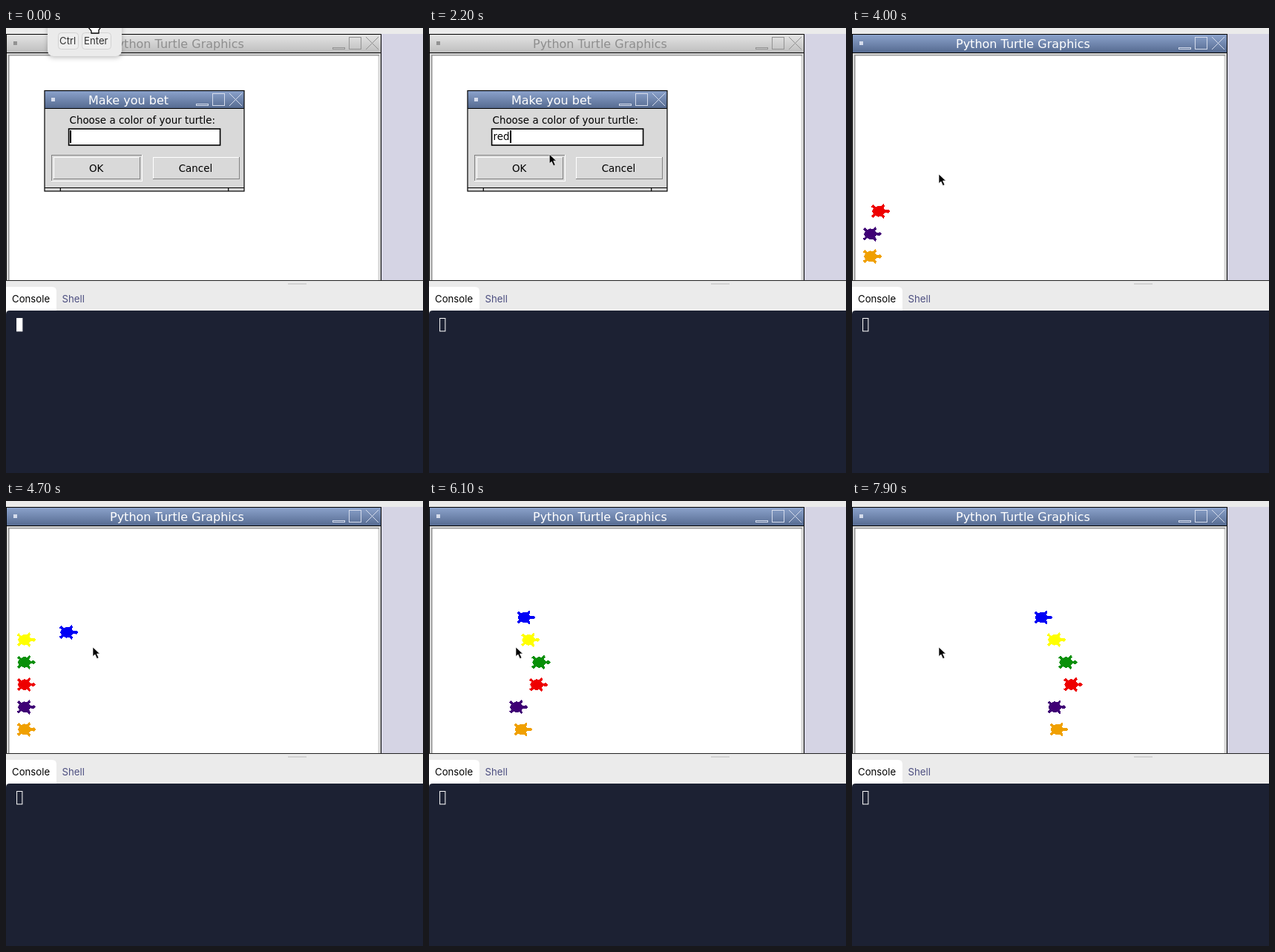
Animation of 562 by 600 pixels, one loop 8000 ms. Source, as an HTML page:

```html
<!DOCTYPE html>
<html lang="en">
<head>
<meta charset="utf-8">
<title>Turtle race</title>
<style>
  html, body { margin: 0; width: 100%; height: 100%; overflow: hidden; background: #ebebeb; }
  svg { display: block; width: 562px; height: 600px; }
  text { font-family: "DejaVu Sans", sans-serif; font-size: 13.45px; fill: #000; }
  .title { font-size: 16px; }
  .ui { font-family: Inter, sans-serif; font-size: 13.2px; }
  .crisp { shape-rendering: crispEdges; }
</style>
</head>
<body>
<svg viewBox="0 0 562 600">
  <defs>
    <linearGradient id="blue" x2="0" y2="1">
      <stop stop-color="#8ba2cb"/><stop offset="1" stop-color="#566b91"/>
    </linearGradient>
    <linearGradient id="gray" x2="0" y2="1">
      <stop stop-color="#e4e4e4"/><stop offset="1" stop-color="#bebebe"/>
    </linearGradient>
    <filter id="shadow" x="-20%" y="-40%" width="140%" height="200%">
      <feDropShadow dx="0" dy="2" stdDeviation="3" flood-opacity=".25"/>
    </filter>
    <clipPath id="canvas"><rect x="5" y="38" width="497" height="302"/></clipPath>
  </defs>

  <rect width="562" height="600" fill="#ebebeb"/>
  <rect x="506" y="8" width="56" height="332" fill="#d5d4e4"/>

  <g id="mainWindow">
    <rect x=".5" y="8.500" width="505" height="332" fill="#d9d9d9" stroke="#000"/>
    <path d="M1 33.300H505" stroke="#000" stroke-width="1.200"/>
    <rect x="3" y="36" width="500" height="304" fill="#969696"/>
    <rect x="4.700" y="37.600" width="498" height="303" fill="#e8e8e8"/>
    <rect x="4.700" y="37.600" width="496.500" height="303" fill="#fff"/>
  </g>
  <g id="mainBar"></g>
  <g id="turtles" class="crisp" clip-path="url(#canvas)"></g>

  <g id="dialog">
    <rect x="52" y="84.500" width="269" height="135.500" fill="#d9d9d9"/>
    <g id="dialogBar"></g>
    <g fill="none" stroke="#000" stroke-width="1.200">
      <rect x="52" y="84.500" width="269" height="135.500"/>
      <path d="M52 108.500H321M52 215.500H321"/>
      <path id="grips" d="M73.300 215v5M299.700 215v5"/>
      <rect x="84.600" y="136" width="204" height="22" fill="#fff" stroke-width="1.600"/>
    </g>
    <text x="85.500" y="129">Choose a color of your turtle:</text>
    <text id="entry" x="86.500" y="151"></text>
    <rect id="caret" y="138" width="2" height="17"/>
    <g id="buttons" class="crisp"></g>
    <text id="okLabel" x="112" y="193.500">OK</text>
    <text x="232.700" y="193.500">Cancel</text>
  </g>

  <rect x="0" y="340" width="562" height="1" fill="#222"/>
  <rect x="0" y="341" width="562" height="44" fill="#ebebeb"/>
  <rect x="380" y="344" width="25" height="2" fill="#d2d2d2"/>
  <path d="M0 381V349H62q6 0 6 6V381z" fill="#fff"/>
  <text class="ui" x="8" y="370.300">Console</text>
  <text class="ui" x="75.500" y="370.300" style="fill:#4d4f80">Shell</text>
  <path d="M0 600V386q0-5 5-5H562V600z" fill="#1c2133"/>
  <rect id="prompt" x="14.600" y="391.500" width="7.300" height="17.300" stroke="#fff"/>

  <g id="tooltip">
    <rect x="56" y="-20" width="100" height="58" rx="8" fill="#ebebeb" filter="url(#shadow)"/>
    <g fill="#eee" stroke="#d2d2d2">
      <rect x="70.500" y="6.500" width="27" height="22" rx="4"/>
      <rect x="102.500" y="6.500" width="39" height="22" rx="4"/>
    </g>
    <text class="ui" x="72" y="22.300" style="fill:#333">Ctrl</text>
    <text class="ui" x="105" y="22.300" style="fill:#333">Enter</text>
  </g>

  <g id="hand"><path d="M-1 0q2-2 3 0v8l8 2q3 1 2 5l-2 3v4H0v-3l-5-6q0-3 4 0z" fill="#fff" stroke="#000" stroke-width="1.300"/></g>
  <g id="arrow"><path d="M0 0V12.500L3 10L5.500 15.500L8 14.500L5.500 9H9.500z" stroke="#fff" stroke-width=".7"/></g>
  <g id="beam" fill="none">
    <path d="M-3.500 -7H-1L0 -6L1 -7H3.500M0 -6V6M-3.500 7H-1L0 6L1 7H3.500" stroke="#fff" stroke-width="2.600"/>
    <path d="M-3.500 -7H-1L0 -6L1 -7H3.500M0 -6V6M-3.500 7H-1L0 6L1 7H3.500" stroke="#000" stroke-width="1.300"/>
  </g>
</svg>
<script>
const LOOP = 8000, STEP = 100;
const $ = id => document.getElementById(id);
const show = (id, on) => { $(id).style.display = on ? '' : 'none'; };
const place = (node, x, y) => node.setAttribute('transform', `translate(${x} ${y})`);

// Value of a row of [time, a, b, ...] steps, linear in between.
function along(steps, t) {
  const next = steps.findIndex(s => s[0] > t);
  if (next < 0) return steps.at(-1).slice(1);
  if (next === 0) return steps[0].slice(1);
  const a = steps[next - 1], b = steps[next];
  const k = (t - a[0]) / (b[0] - a[0]);
  return a.slice(1).map((v, i) => v + (b[i + 1] - v) * k);
}

// Value of the last [time, value] entry that has begun.
const latest = (steps, t) => steps.findLast(s => s[0] <= t)[1];

function titleBar(x, y, width, height, label, labelX, active) {
  const ink = active ? '#fff' : '#8e8e8e', line = active ? '#d5dcec' : '#929292';
  const r = x + width;
  return `<rect class="crisp" x="${x}" y="${y}" width="${width}" height="${height}" fill="url(#${active ? 'blue' : 'gray'})"/>` +
    (label && `<g fill="none" stroke="${line}">
      <rect class="crisp" x="${x + 9}" y="${y + 9}" width="5" height="5" fill="${line}" stroke="none"/>
      <rect class="crisp" x="${r - 64.5}" y="${y + 17.5}" width="16" height="2"/>
      <rect class="crisp" x="${r - 42.5}" y="${y + 3.5}" width="16" height="16"/>
      <path d="M${r - 20} ${y + 3}l17 17m0-17l-17 17"/></g>
      <text class="title" x="${labelX}" y="${y + 18}" style="fill:${ink}">${label}</text>`);
}

function bevel(x, y, w, h, fill, sunken) {
  const [a, b] = sunken ? ['#828282', '#fff'] : ['#fff', '#828282'];
  return `<rect x="${x}" y="${y}" width="${w}" height="${h}" fill="${fill}"/>
    <path d="M${x + .5} ${y + h}V${y + .5}H${x + w}" fill="none" stroke="${a}"/>
    <path d="M${x} ${y + h - .5}H${x + w - .5}V${y}" fill="none" stroke="${b}"/>`;
}

const HOME = [253.5, 238], GATE = 23.5, TRAVEL = 250, FIRST = 3262, RACE = FIRST + 6 * TRAVEL;
const RACE_TIMES = [5300, 5600, 6500, 6800, 7900];
const HALF_SHELL = [[16, 0], [14, 2], [10, 1], [7, 4], [9, 7], [8, 9], [5, 6], [1, 7], [-3, 5], [-6, 8], [-8, 6], [-5, 4], [-7, 0]];
const shell = [...HALF_SHELL, ...HALF_SHELL.slice(1, -1).reverse().map(([x, y]) => [x, -y])].join(' ');

const turtles = [
  ['#f0a000', 63.5, 77, 160, 199, 275],
  ['#3f0075', 69, 90, 138, 161, 272],
  ['#ee0000', 82.5, 106, 174, 202, 294],
  ['#089008', 78.5, 112, 175, 207.5, 287],
  ['#ffff00', 69, 94, 164, 192.5, 271.5],
  ['#0000f5', 73.5, 96, 152, 175, 254],
].map(([color, ...xs], i) => {
  const node = document.createElementNS('http://www.w3.org/2000/svg', 'polygon');
  node.setAttribute('points', shell);
  node.setAttribute('fill', color);
  node.setAttribute('stroke', color);
  $('turtles').append(node);
  const y = 308 - i * 30.2, start = FIRST + i * TRAVEL;
  const path = [[start, ...HOME], [start + TRAVEL, GATE, y], [RACE, GATE, y], ...xs.map((x, k) => [RACE_TIMES[k], x, y])];
  return { node, start, path };
});

const POINTER = [
  [0, 115, -15], [200, 150, 40], [400, 225, 105], [600, 275, 148], [800, 238, 149],
  [900, 202, 152], [1000, 174.5, 158.3], [2100, 174.5, 158.3], [2300, 150, 182], [2500, 117, 197],
];
const POINTER_KIND = [[0, 'hand'], [100, 'arrow'], [600, 'beam'], [2200, 'arrow']];
const TYPED = [[0, ''], [1700, 'r'], [1900, 're'], [2200, 'red']];
const CARET = [[0, 1], [100, 0], [400, 1], [1000, 0], [1300, 1], [2800, 0], [3100, 1]];
const CARET_X = { '': 86, r: 92, re: 100.5, red: 109 };
const PROMPT = [[0, '#fff'], [400, 'none'], [900, '#fff'], [1000, 'none']];
const PROMPT_LINE = [[0, '#fff'], [400, 'none'], [900, '#fff']];
const HOVER = 2600, PRESS = 3000, CLOSING = 3200, CLOSED = 3300;

function draw(t) {
  const closed = t >= CLOSED, pressed = t >= PRESS, closing = t >= CLOSING;
  $('mainBar').innerHTML = titleBar(1, 9, 504, 24, 'Python Turtle Graphics', 140, closed);
  show('dialog', !closed);
  show('grips', !closing);
  $('dialogBar').innerHTML = titleBar(52, 85, 269, 23, closing ? '' : 'Make you bet', 111, true);

  const typed = latest(TYPED, t);
  $('entry').textContent = typed;
  $('caret').setAttribute('x', CARET_X[typed]);
  show('caret', latest(CARET, t));
  $('buttons').innerHTML = bevel(61, 171, 123, 36, '#d9d9d9', true) +
    bevel(64, 174, 117, 30, t >= HOVER ? '#ececec' : '#d9d9d9', pressed) +
    bevel(198, 174, 117, 30, '#d9d9d9');
  place($('okLabel'), pressed ? 1 : 0, pressed ? 2 : 0);

  show('tooltip', t < 200);
  $('prompt').setAttribute('fill', latest(PROMPT, t));
  $('prompt').setAttribute('stroke', latest(PROMPT_LINE, t));

  for (const { node, start, path } of turtles) {
    node.style.display = t >= start ? '' : 'none';
    place(node, ...along(path, t));
  }

  const kind = latest(POINTER_KIND, t);
  for (const id of ['hand', 'arrow', 'beam']) show(id, id === kind);
  place($(kind), ...along(POINTER, t));
}

const began = performance.now();
let shown = -1;
function tick() {
  const t = Math.floor((performance.now() - began) % LOOP / STEP) * STEP;
  if (t !== shown) draw(shown = t);
  requestAnimationFrame(tick);
}
tick();
</script>
</body>
</html>
```
